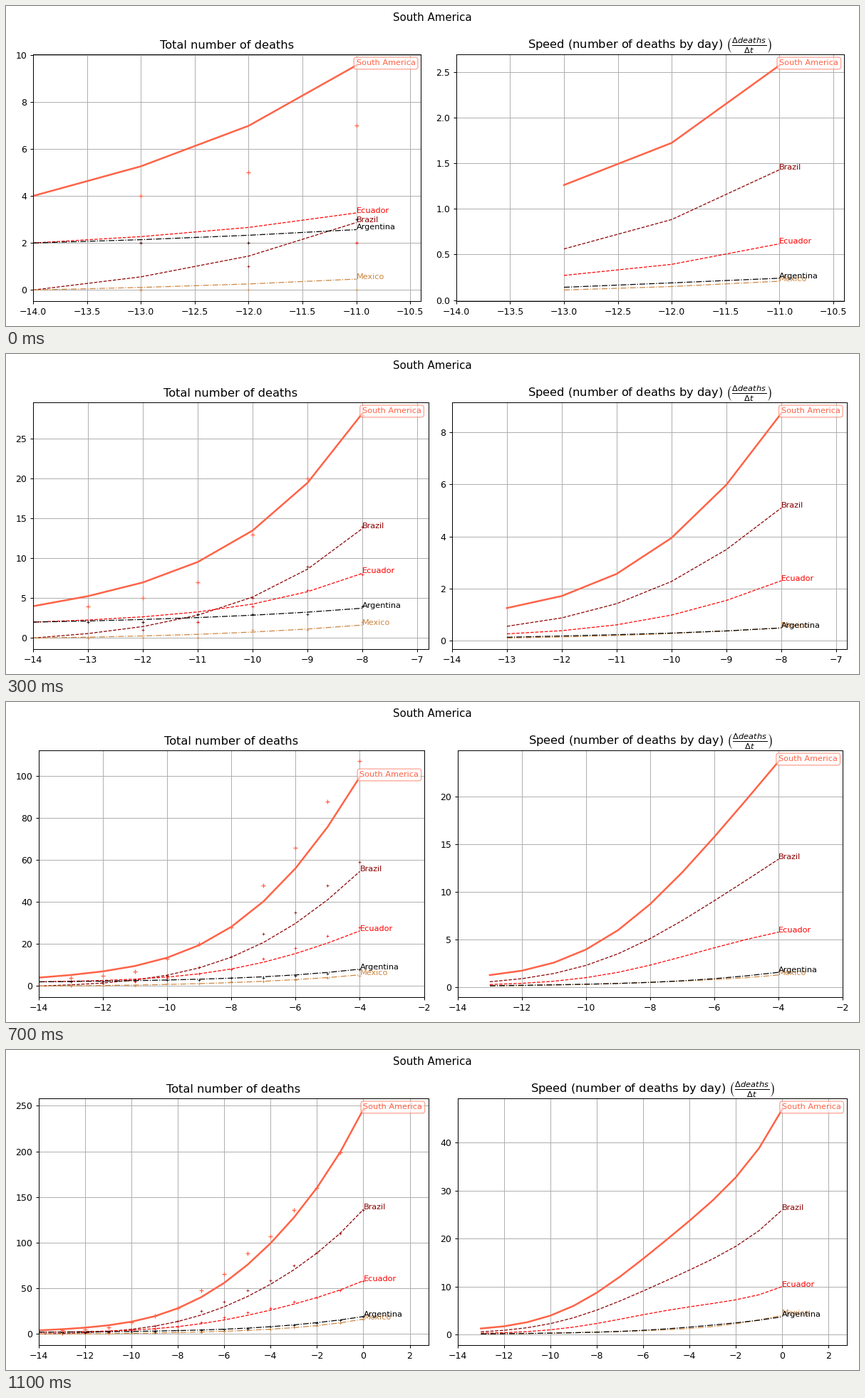
A matplotlib script for the animation above (4.1 s loop, 1197 by 450 pixels).

```python
import numpy as np
import matplotlib.pyplot as plt
from matplotlib.animation import FuncAnimation

W, H, DPI = 1197, 450, 90
START, FIRST_END, LAST_END = -14, -11, 0
TICK_PX = 12.5            # tick label size in pixels
PAD, TICK_GAP, SPINE_PAD = 13.5, 8.75, 3.2
TOP, BOTTOM = 67.65, 415.2

# Daily speed follows a smooth log-curve through these days.
KEY_DAYS = [-13, -10, -7, -4, -2, 0]

# Relative gap between the reported and the smoothed totals.
BIAS_DAYS = [-13, -11, -10, -9, -8, -7, -5, -4, -3, -2]
BIAS = [-.24, -.26, -.05, .025, 0, .19, .16, .075, .067, 0]

# name, colour, line style, first total, bias scale, speed on the key days
SERIES = [
    ("Brazil", "darkred", "--", 0, 1, [.56, 2.28, 7.0, 13.45, 18.4, 26.0]),
    ("Ecuador", "red", "--", 2, 1, [.27, .99, 3.2, 5.78, 7.25, 10.0]),
    ("Mexico", "peru", "-.", 0, 0, [.11, .285, .63, 1.27, 2.25, 4.0]),
    ("Argentina", "black", "-.", 2, 0, [.14, .30, .66, 1.55, 2.45, 3.7]),
    ("South America", "tomato", "-", 4, 1, [1.26, 3.95, 12.07, 23.73, 32.8, 46.97]),
]

fig, (total_ax, speed_ax) = plt.subplots(1, 2, figsize=(13.3, 5), dpi=DPI)
fig.suptitle("South America", fontsize=12)


def curves(days, base, scale, keys):
    """Speed, smoothed total and reported total for each day."""
    fit = np.polyfit(KEY_DAYS, np.log(keys), len(keys) - 1)
    speed = np.exp(np.polyval(fit, days))
    total = base + np.cumsum(speed)
    reported = np.round(total * (1 + scale * np.interp(days, BIAS_DAYS, BIAS)))
    return speed, total, reported


def text_width(label):
    ems = {"\u2212": .838, ".": .318}
    return TICK_PX * sum(ems.get(c, .636) for c in label)


def visible_ticks(axis):
    lo, hi = axis.get_view_interval()
    locs = axis.get_majorticklocs()
    labels = axis.get_major_formatter().format_ticks(locs)
    return [(v, s) for v, s in zip(locs, labels) if lo <= v <= hi + 1e-9]


def label_room(ax):
    return TICK_GAP + max(text_width(s) for _, s in visible_ticks(ax.yaxis))


def arrange():
    """Fit both axes tightly around their tick labels."""
    lo, hi = total_ax.get_xlim()
    last, label = visible_ticks(total_ax.xaxis)[-1]
    spare = (hi - last) / (hi - lo) * W * .775 / 2.2
    over = max(SPINE_PAD, text_width(label) / 2 - spare)
    left = PAD + label_room(total_ax)
    right = W - PAD - over
    gap = over + PAD + label_room(speed_ax)
    width = (right - left - gap) / 2
    for ax, x in ((total_ax, left), (speed_ax, left + width + gap)):
        ax.set_position([x / W, 1 - BOTTOM / H, width / W, (BOTTOM - TOP) / H])


def draw_curve(ax, x, y, name, color, style, main):
    ax.plot(x, y, style, color=color, lw=2 if main else 1)
    box = dict(boxstyle="round", fc="white", ec=color, alpha=.6) if main else None
    ax.text(x[-1], y[-1], name, color=color, fontsize=9, bbox=box)


def update(i):
    end = min(FIRST_END + i, LAST_END)
    days = np.arange(START + 1, end + 1)
    for ax in (total_ax, speed_ax):
        ax.clear()
        ax.grid(True)

    for name, color, style, base, scale, keys in SERIES:
        main = style == "-"
        speed, total, reported = curves(days, base, scale, keys)
        total_ax.plot(days, reported, "+", color=color,
                      ms=5 if main else 3, mew=1 if main else .6)
        draw_curve(total_ax, np.r_[START, days], np.r_[base, total],
                   name, color, style, main)
        draw_curve(speed_ax, days, speed, name, color, style, main)

    for ax in (total_ax, speed_ax):
        ax.set_xlim(START, START + 1.2 * (end - START))
    total_ax.set_title("Total number of deaths", fontsize=13)
    speed_ax.set_title("Speed (number of deaths by day) "
                       r"$\left(\frac{\Delta deaths}{\Delta t}\right)$", fontsize=13)
    arrange()
    return []


anim = FuncAnimation(fig, update, frames=41, interval=100,
                     init_func=lambda: update(0), repeat=True, repeat_delay=0)
plt.show()
```
